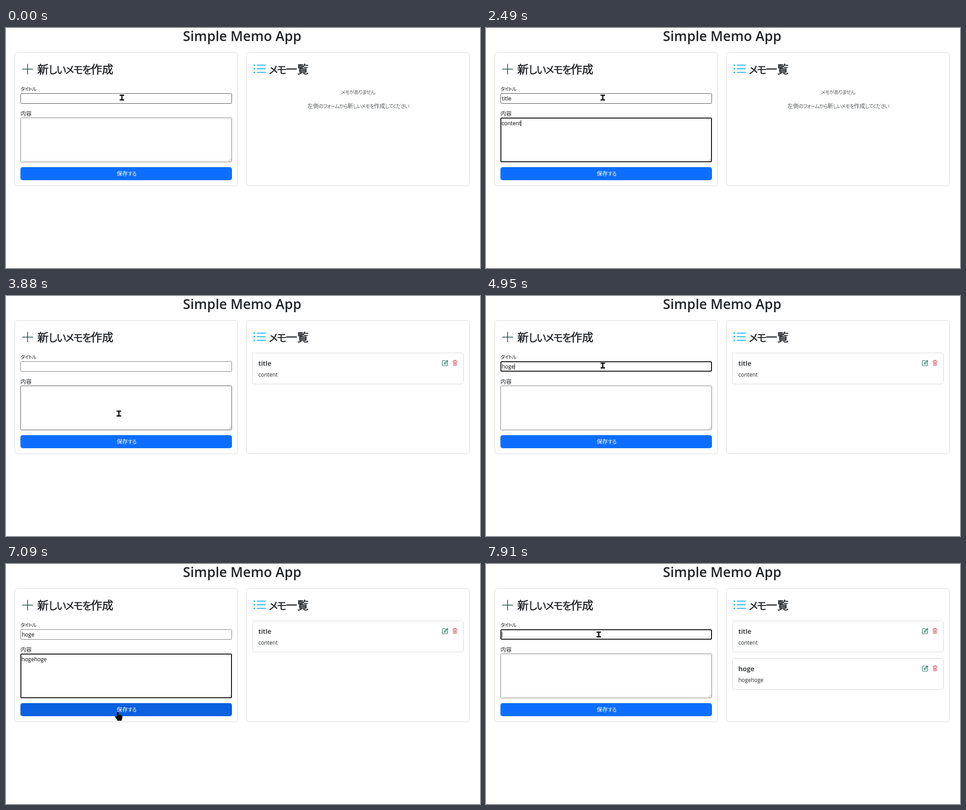
These frames come from a looping animation (1051 px wide and 533 px high, 8 s). An HTML page:

```html
<!DOCTYPE html>
<html lang="ja">
<head>
<meta charset="utf-8">
<title>Simple Memo App</title>
<style>
  html, body { margin: 0; width: 100%; height: 100%; overflow: hidden; background: #fff; }
  svg { display: block; }
  text { font: 12px "Open Sans", "Noto Sans CJK JP", "Noto Sans CJK", sans-serif; fill: #212529; }
  .jp { font-size: 12.4px; }
  .kana { font-size: .9em; font-feature-settings: "palt"; letter-spacing: -.08em; }
  .mid { text-anchor: middle; }
  .h1 { font-size: 30px; font-weight: 600; }
  .h2 { font-size: 25.1px; stroke: #212529; stroke-width: .6px; }
  .h5 { font-size: 15px; font-weight: 600; }
  .muted { fill: #595c5f; }
  .typed { fill: #000; }
  .card { fill: #fff; stroke: #d4d5d6; }
  .field { fill: #fff; }
  .line { fill: none; }
</style>
</head>
<body>
<svg width="1051" height="533" viewBox="0 0 1051 533">
  <defs>
    <g id="tools" class="line" stroke-linecap="round" stroke-linejoin="round">
      <path stroke="#17735c" stroke-width="1.2" d="M974 143.5h-5q-1.5 0-1.5 1.5v8.500q0 1.500 1.500 1.500h8.500q1.500 0 1.500-1.500v-5M971.500 151.500l.7-2.500 6-6 1.800 1.800-6 6zM976.800 144.400l1.800 1.800"/>
      <path stroke="#dc4c5a" d="M990.500 144.500h10M993.500 144v-1.500h4v1.500M991.500 145l.7 9.500h6.600l.7-9.500M993.800 147l.2 5.500M995.500 147v5.500M997.200 147l-.2 5.500"/>
    </g>
  </defs>

  <text class="h1 mid" x="523.500" y="29">Simple Memo App</text>
  <rect class="card" x="19.500" y="54.500" width="494" height="296" rx="5"/>
  <rect class="card" x="533.500" y="54.500" width="494" height="296" rx="5"/>

  <path class="line" stroke="#235c57" stroke-width="1.700" d="M36 91.300h24M47.800 79.500v23.500"/>
  <text class="jp h2" x="69.500" y="100.500">新しいメモを作成</text>
  <g stroke="#19b0f0" stroke-width="2" stroke-linecap="round">
    <path d="M557 82.500h18M557 90.500h18M557 98.500h18"/>
    <path stroke-width="3.600" d="M550.500 82.500h0M550.500 90.500h0M550.500 98.500h0"/>
  </g>
  <text class="jp h2" x="583" y="100.500">メモ一覧</text>

  <text class="jp" x="32" y="140">タイトル</text>
  <rect id="titleBox" class="field" rx="2"/>
  <text id="titleText" class="typed" x="35" y="161"></text>
  <text class="jp" x="32" y="194.500">内容</text>
  <rect id="bodyBox" class="field" rx="2"/>
  <path class="line" stroke="#777" stroke-width=".8" d="M493.500 296l6-6M497 296l2.500-2.500"/>
  <text id="bodyText" class="typed" x="34.500" y="216"></text>
  <rect id="caret" width="1" height="14" fill="#000"/>

  <rect id="save" x="32" y="309" width="469" height="29" rx="5"/>
  <text class="jp mid" x="267" y="328" style="fill:#fff">保存する</text>

  <g id="empty">
    <text class="jp mid muted" x="780.500" y="147">メモがありません</text>
    <text class="jp mid muted" x="781" y="178">左側のフォームから新しいメモを作成してください</text>
  </g>
  <g id="memo1">
    <rect class="card" x="546.500" y="126.500" width="468" height="69" rx="5"/>
    <text class="h5" x="559.500" y="155">title</text>
    <text x="559.500" y="178.500">content</text>
    <use href="#tools"/>
  </g>
  <g id="memo2" transform="translate(0 83)">
    <rect class="card" x="546.500" y="126.500" width="468" height="69" rx="5"/>
    <text class="h5" x="559.500" y="155">hoge</text>
    <text x="559.500" y="178.500">hogehoge</text>
    <use href="#tools"/>
  </g>

  <g id="pointer">
    <circle id="ring" r="12" fill="#ff0" fill-opacity=".5"/>
    <path id="beam" class="line" stroke="#000" stroke-width="2.600" d="M-5-5.300h10M-5 5.300h10M0-6V6"/>
    <path id="arrow" stroke="#fff" d="M0 0v16l4-3.500 2.500 5.500 2.500-1-2.500-5.500h5z"/>
    <path id="hand" stroke="#000" d="M-1.500 1q1.500-2 3 0v5l6 1.200q2 .6 2 3v2l-1.500 5v1.500h-9v-1.500l-4.500-6q-.5-2.500 2.500-1.500l1.500 1z"/>
  </g>
</svg>
<script>
const LOOP = 8000, SAVES = [3660, 7300];
const $ = id => document.getElementById(id);
const show = (id, on) => $(id).style.display = on ? '' : 'none';
const set = (id, attrs) => Object.entries(attrs).forEach(([k, v]) => $(id).setAttribute(k, v));

// Kana are set narrower than kanji.
document.querySelectorAll('.jp').forEach(el => {
  el.innerHTML = el.textContent.replace(/[ぁ-ヶー]+/g, '<tspan class="kana">$&</tspan>');
});

const fields = {
  title: { y: 145, h: 23, caretY: 150 },
  body: { y: 199, h: 99, caretY: 204.5 }
};

const keys = [];
const type = (field, text, from, to) => [...text].forEach((ch, i) =>
  keys.push({ field, ch, at: from + (to - from) * i / Math.max(1, text.length - 1) }));
type('title', 't', 690, 690);
type('title', 'itle', 890, 1160);
type('body', 'con', 1630, 1830);
type('body', 'tent', 2160, 2490);
type('title', 'hoge', 4680, 4950);
type('body', 'hogehoge', 5490, 6090);

const focuses = [[0, ''], [290, 'title'], [1360, 'body'], [3450, ''],
  [4060, 'title'], [5210, 'body'], [7160, ''], [7780, 'title']];
const clicks = [[290, 420], [3450, 3660], [4060, 4220], [7160, 7300], [7780, 7910]];

// Pointer moves are sampled: start, end, interval.
const moves = [[290, 420, 65], [2890, 3660, 70], [3740, 4220, 80], [6550, 7300, 67.5], [7370, 7910, 67.5]];
const path = [[0, 257, 154.5], [290, 257, 154.5], [420, 259, 154.5], [2820, 259, 154.5],
  [3380, 245.5, 319], [3660, 245.5, 319], [4060, 259, 154.5], [6480, 259, 154.5],
  [6820, 212, 411], [7090, 248, 329], [7160, 250, 327], [7300, 250, 327],
  [7710, 250, 156.5], [LOOP, 250, 156.5]];

const latest = (list, t) => list.filter(([at]) => at <= t).pop();

function pointerAt(t) {
  const move = latest(moves, t);
  if (move) {
    const [from, to, step] = move;
    t = Math.min(to, from + Math.floor((t - from) / step + .001) * step);
  }
  const i = path.findIndex(p => p[0] > t);
  const [t0, x0, y0] = path[i - 1], [t1, x1, y1] = path[i];
  const u = (t - t0) / (t1 - t0), e = u * u * (3 - 2 * u);
  return [x0 + (x1 - x0) * e, y0 + (y1 - y0) * e];
}

function draw(t) {
  const [x, y] = pointerAt(t);
  const over = (top, h) => x >= 32 && x <= 501 && y >= top && y <= top + h;
  const pressed = clicks.some(([from, to]) => t >= from && t < to);
  const [focusedAt, focus] = latest(focuses, t);
  const saved = SAVES.filter(s => s <= t);
  const typed = keys.filter(k => k.at <= t + .01 && k.at >= (saved[saved.length - 1] || 0));
  let onField = false;

  for (const [name, f] of Object.entries(fields)) {
    const hover = over(f.y, f.h), active = focus === name, w = active ? 2 : 1;
    onField = onField || hover;
    $(name + 'Text').textContent = typed.filter(k => k.field === name).map(k => k.ch).join('');
    set(name + 'Box', {
      x: 32 + w / 2, y: f.y + w / 2, width: 469 - w, height: f.h - w, 'stroke-width': w,
      stroke: active ? '#101010' : hover ? '#4a4a4a' : '#767676'
    });
  }

  const lastKey = typed.length ? typed[typed.length - 1].at : 0;
  const blink = Math.floor((t - Math.max(focusedAt, lastKey)) / 530) % 2;
  show('caret', focus && !blink);
  if (focus) {
    const text = $(focus + 'Text');
    set('caret', { x: Math.round(+text.getAttribute('x') + text.getComputedTextLength() - .4), y: fields[focus].caretY });
  }

  const onSave = over(309, 29);
  set('save', { fill: !onSave ? '#0d6efd' : pressed ? '#0a5ad0' : '#0b61df' });
  show('empty', saved.length === 0);
  show('memo1', saved.length > 0);
  show('memo2', saved.length > 1);

  set('pointer', { transform: `translate(${x} ${y})` });
  show('ring', pressed);
  show('beam', onField);
  show('hand', onSave);
  show('arrow', !onField && !onSave);
  set('hand', { fill: pressed ? '#f2a32b' : '#000' });
}

const start = performance.now();
function frame() {
  draw((performance.now() - start) % LOOP);
  requestAnimationFrame(frame);
}
frame();
</script>
</body>
</html>
```
